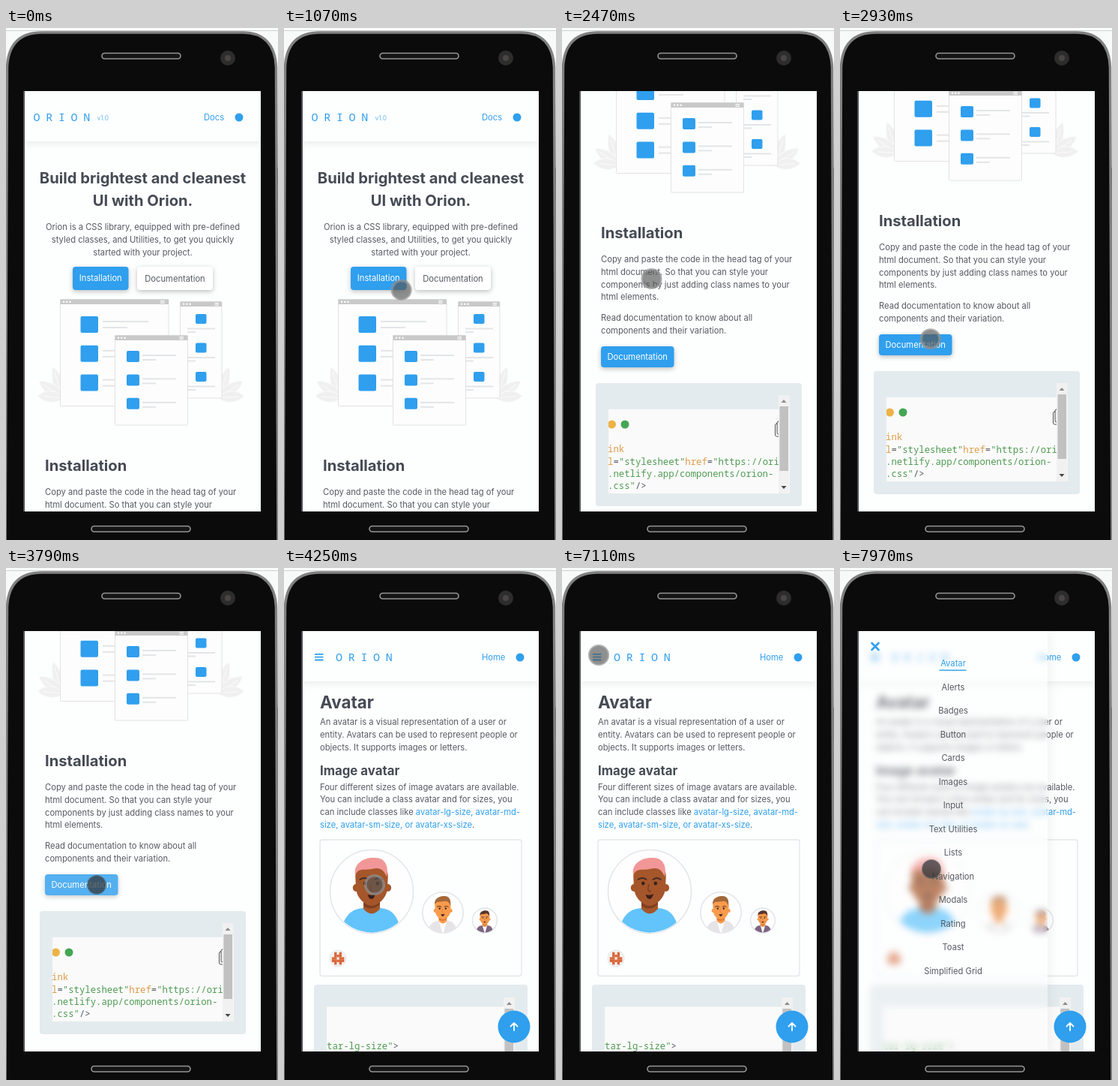
Animation of 363 by 682 pixels, one loop 8000 ms. Source, as an HTML page:

```html
<!DOCTYPE html>
<html lang="en">
<head>
<meta charset="utf-8">
<title>Orion on a phone</title>
<style>
html, body { margin: 0; width: 100%; height: 100%; overflow: hidden; background: #f8f9f9; }
#stage { position: relative; width: 363px; height: 682px; overflow: hidden; }
#stage svg { position: absolute; left: 0; top: 0; display: block; }
#screen { position: absolute; left: 25px; top: 84px; width: 315px; height: 560px; overflow: hidden; background: #fdfefe; }
#menu {
  position: absolute; left: 0; top: 0; width: 252px; height: 560px;
  background: rgba(255,255,255,.28); backdrop-filter: blur(5px);
  box-shadow: 2px 0 16px rgba(0,0,0,.06);
}
text { font-family: Inter, sans-serif; font-size: 11.2px; fill: #555a61; }
.mono { font-family: "Noto Sans Mono", monospace; font-size: 12.3px; }
.brand { font-family: "Noto Sans Mono", monospace; font-size: 15px; letter-spacing: 7.7px; fill: #2f9fee; }
.bar { filter: drop-shadow(0 3px 5px rgba(0,0,0,.07)); }
.lift { filter: drop-shadow(0 2px 3px rgba(0,0,0,.25)); }
</style>
</head>
<body>
<div id="stage">
  <svg id="phone" width="363" height="682"></svg>
  <div id="screen">
    <svg id="home" width="315" height="560" viewBox="25 84 315 560"></svg>
    <svg id="docs" width="315" height="560" viewBox="25 84 315 560"></svg>
    <div id="menu"><svg width="252" height="560" viewBox="25 84 252 560"></svg></div>
  </div>
  <svg width="363" height="682"><circle id="touch"/></svg>
</div>
<script>
const BLUE = '#2f9fee', LINE = '#e3e5e7', GREEN = '#4f9a52', ORANGE = '#dd9a45', INK = '#555a61';
const $ = s => document.querySelector(s);

const rect = (x, y, w, h, fill, r = 0, extra = '') =>
  `<rect x="${x}" y="${y}" width="${w}" height="${h}" rx="${r}" fill="${fill}" ${extra}/>`;
const disc = (x, y, r, fill, extra = '') => `<circle cx="${x}" cy="${y}" r="${r}" fill="${fill}" ${extra}/>`;
const path = (d, fill, extra = '') => `<path d="${d}" fill="${fill}" ${extra}/>`;
const stroke = (color, w = 1) => `stroke="${color}" stroke-width="${w}" stroke-linecap="round" stroke-linejoin="round"`;
// y is the visual middle of the line
const text = (s, x, y, { size = 11.2, fill = INK, weight = 400, anchor = 'start' } = {}) =>
  `<text x="${x}" y="${y + size * .36}" text-anchor="${anchor}" style="font-size:${size}px;font-weight:${weight};fill:${fill}">${s}</text>`;
const lines = (rows, x, y, opt) => rows.map((s, i) => text(s, x, y + i * 16.75, opt)).join('');
const head = (s, x, y, size, anchor) => text(s, x, y, { size, weight: 700, fill: '#454b54', anchor });
const brand = x => `<text class="brand" x="${x}" y="123.5">ORION</text>`;
const code = (parts, x, y) => `<text class="mono" x="${x}" y="${y + 4.4}">` +
  parts.map(([s, c]) => `<tspan style="fill:${c}">${s}</tspan>`).join('') + '</text>';
const button = (id, label, x, y, w, h, fill, ink, dy = 0) =>
  `<g id="${id}">${rect(x, y, w, h, fill, 4, 'class="lift"')}${text(label, x + w / 2, y + h / 2 + dy, { fill: ink, anchor: 'middle' })}</g>`;
const header = () => rect(25, 70, 315, 81, '#fdfefe', 0, 'class="bar"');
const tri = (x, y, s, fill) => path(`M${x - 3.5} ${y + 2 * s}h7l-3.5 ${-4 * s}z`, fill);

function drawPhone() {
  $('#phone').innerHTML =
    rect(0, 0, 363, 3, '#fbfcfc') + rect(0, 3, 363, 1, '#cfd1d1') +
    rect(358, 185, 5, 46, '#555', 2) + rect(358, 307, 5, 71, '#555', 2) +
    path('M-1 700L1.500 52C3 22 18 6 48 6H316C344 6 359 22 360.500 52L363 700Z', '#0b0b0b', stroke('#808080', 3.5)) +
    rect(128, 33.5, 105, 7.5, '#151515', 3.75, stroke('#949494', 1.6)) +
    rect(114, 663.5, 132, 7.5, '#151515', 3.75, stroke('#949494', 1.6)) +
    disc(296, 40, 10, '#2d2d2d') + disc(296, 40, 4, '#4a4545') +
    rect(23, 84, 2, 560, '#505154');
}

// browser window with rows of a square and two lines
function pane(x, y, w, h, burger, rows) {
  let s = rect(x, y, w, h, '#fdfdfd', 1, stroke('#e2e2e2')) + rect(x, y, w, 6.5, '#c9c9c9');
  for (let i = 0; i < 3; i++) {
    s += disc(x + 4.5 + i * 4.3, y + 3.3, 1.2, '#fff');
    s += rect(x + w - burger, y + 1.4 + i * 1.6, 5.5, .8, '#fff');
  }
  const { sx, sy, sw, sh, step, lx, ly, gap, l1, l2 } = rows;
  for (let i = 0; i < 3; i++) {
    const d = i * step;
    s += rect(sx, sy + d, sw, sh, BLUE, 2) +
      rect(lx, ly + d, l1, 2, LINE) + rect(lx, ly + gap + d, l2, 2, LINE);
  }
  return s;
}

function leaves(x, y, dir) {
  return [-72, -35, -5].map((a, i) =>
    `<g transform="translate(${x} ${y}) scale(${dir} 1) rotate(${a})">` +
    path(`M0 0C8 -11 ${28 - i * 2} -10 ${44 - i * 5} 0C${28 - i * 2} 9 8 9 0 0Z`, '#f0f0f0', stroke('#fafafa')) +
    path(`M2 0H${36 - i * 5}`, 'none', stroke('#fafafa')) + '</g>').join('');
}

function codeBox() {
  const y = 783, track = 289;
  return rect(45, y, 275, 164, '#e4ebee', 4) + rect(62, y + 35, 242, 112, '#fafafa') +
    `<clipPath id="pre"><rect x="61" y="${y + 35}" width="228.500" height="112"/></clipPath><g clip-path="url(#pre)">` +
    disc(66.5, y + 55, 5.5, '#edb347') + disc(84, y + 55, 5.5, '#45a653') +
    rect(60, y + 35, 2, 112, '#e4ebee') +
    rect(284.5, y + 54, 10, 17, '#fafafa', 2, stroke('#555')) + rect(287, y + 51, 10, 17, '#ececec', 2, stroke('#555')) +
    code([['ink', ORANGE]], 61, 871) +
    code([['l', ORANGE], ['=', INK], ['"stylesheet"', GREEN], ['href', ORANGE], ['=', INK], ['"https://ori', GREEN]], 61, 887.5) +
    code([['.netlify.app/components/orion-', GREEN]], 61, 904) +
    code([['.css"', GREEN], ['/>', INK]], 61, 920) + '</g>' +
    rect(track, y + 16, 14.5, 131, '#f1f1f1') + rect(track + 1.5, y + 31, 11.5, 86, '#c1c1c1') +
    tri(track + 7, y + 24, 1, '#8c8c8c') + tri(track + 7, y + 139, -1, '#444');
}

function drawHome() {
  $('#home').innerHTML = '<g id="page">' + header() + brand(36.5) +
    text('v1.0', 121.5, 119.5, { size: 8.4, fill: '#6cbcf3' }) +
    text('Docs', 264, 119, { fill: BLUE }) + disc(311, 119, 5.5, BLUE) +
    head('Build brightest and cleanest', 182.5, 200, 20.2, 'middle') +
    head('UI with Orion.', 182.5, 230, 20.2, 'middle') +
    lines(['Orion is a CSS library, equipped with pre-defined', 'styled classes, and Utilities, to get you quickly',
      'started with your project.'], 182.5, 265, { anchor: 'middle' }) +
    button('install', 'Installation', 89, 318, 74.5, 31, BLUE, '#fff', -1) +
    button('more', 'Documentation', 175, 318, 101, 31, '#fff', INK, .5) +
    leaves(76, 493, -1) + leaves(284, 493, 1) +
    pane(72.5, 361.5, 144.5, 142, 11, { sx: 99.5, sy: 384, sw: 23.5, sh: 22, step: 38.8, lx: 129, ly: 390, gap: 8, l1: 61, l2: 33 }) +
    pane(232.5, 364.5, 55.5, 128.5, 9.5, { sx: 253, sy: 381, sw: 14.5, sh: 13, step: 38.5, lx: 242, ly: 399.5, gap: 4.5, l1: 37, l2: 11 }) +
    pane(145.5, 409.5, 97, 119.5, 11, { sx: 161, sy: 430, sw: 17, sh: 15, step: 31.4, lx: 182, ly: 435, gap: 6, l1: 45, l2: 18 }) +
    head('Installation', 52, 583, 20.2) +
    lines(['Copy and paste the code in the head tag of your', 'html document. So that you can style your',
      'components by just adding class names to your', 'html elements.'], 52, 618) +
    lines(['Read documentation to know about all', 'components and their variation.'], 52, 696) +
    button('open', 'Documentation', 52, 734, 97.5, 28, BLUE, '#fff') + codeBox() + '</g>';
}

function avatar(id, x, y, k, { skin, dark, hair, shirt, inner = shirt }) {
  return `<g transform="translate(${x} ${y}) scale(${k})">` +
    `<clipPath id="${id}"><circle r="54.500"/></clipPath>` + disc(0, 0, 55.5, '#fefefe', stroke('#e3e6ea', 1.6 / k)) +
    `<g clip-path="url(#${id})">` +
    path('M-42 60C-38 28 -24 23 -11 22H11C24 23 36 28 40 60Z', shirt) +
    path('M-11 22H11L0 60Z', inner) +
    path('M-11 5H11V23Q0 36 -11 23Z', skin) + path('M-11 14Q0 24 11 14V17Q0 27 -11 19Z', dark) +
    '<g transform="scale(.87 1)">' + disc(-24, -5, 5, skin) + disc(25, -5, 5, skin) +
    path('M-25 -20C-25 -46 25 -46 25 -20L24 -3C22 10 10 18 0 18S-22 10 -24 -3Z', skin) +
    path('M-25 -22C-29 -38 -10 -46 4 -45C20 -46 27 -34 23 -20C18 -30 12 -33 0 -30C-12 -28 -20 -32 -25 -22Z', hair) +
    path('M-18 -16Q-11 -20 -5 -16M5 -16Q11 -20 17 -16', 'none', stroke('#432a25', 2)) +
    disc(-10, -11, 2.6, '#35221f') + disc(9, -11, 2.6, '#35221f') +
    path('M-1 -9Q-5 -1 1 0', 'none', stroke(dark, 1.8)) +
    path('M-6 4Q1 6 6 3Q3 11 -1 10Q-5 9 -6 4Z', '#3a201c') + '</g></g></g>';
}

function identicon(x, y, cell) {
  return disc(x, y, 11, '#f5f3f2', stroke('#e3e6ea')) +
    ['.#.#.', '.###.', '##.##', '#####', '.#.#.'].map((row, r) => [...row].map((c, i) =>
      c === '#' ? rect(x + (i - 2.5) * cell, y + (r - 2.5) * cell, cell + .1, cell + .1, '#d9683a') : '').join('')).join('');
}

function drawDocs() {
  const burger = [0, 1, 2].map(i => rect(41, 114 + i * 3.8, 11.5, 1.8, BLUE, .5)).join('');
  const link = s => `<tspan style="fill:${BLUE}">${s}</tspan>`;
  $('#docs').innerHTML = rect(25, 84, 315, 560, '#fdfefe') + header() + burger + brand(69) +
    text('Home', 264, 119, { fill: BLUE }) + disc(315, 119, 5.5, BLUE) +
    head('Avatar', 48, 179, 22.4) +
    lines(['An avatar is a visual representation of a user or', 'entity. Avatars can be used to represent people or',
      'objects. It supports images or letters.'], 48, 205) +
    head('Image avatar', 48, 270, 16.8) +
    lines(['Four different sizes of image avatars are available.', 'You can include a class avatar and for sizes, you',
      'can include classes like ' + link('avatar-lg-size, avatar-md-'),
      link('size, avatar-sm-size, or avatar-xs-size') + '.'], 48, 291.5) +
    rect(48, 362, 269, 181.5, 'none', 3, stroke('#e2e7eb', 1.4)) +
    avatar('big', 117, 431, 1, { skin: '#a5562a', dark: '#7f3e20', hair: '#f29797', shirt: '#62c4fb' }) +
    avatar('mid', 212, 459, .49, { skin: '#f99b4c', dark: '#d97a35', hair: '#a4683a', shirt: '#e6e4e6', inner: '#fff' }) +
    avatar('small', 268, 469.5, .295, { skin: '#f3974c', dark: '#cf7434', hair: '#5a352c', shirt: '#7c6580', inner: '#fff' }) +
    identicon(72, 520, 3.3) +
    rect(40, 555, 285, 110, '#e4ebee', 4) + rect(57, 584.5, 251, 70, '#fafafa') +
    rect(293, 572, 15, 80, '#f1f1f1') + tri(300.5, 580, 1, '#8c8c8c') +
    '<g id="late">' + rect(294.5, 587, 11.5, 60, '#c1c1c1') + code([['tar-lg-size"', GREEN], ['>', INK]], 57, 637) + '</g>' +
    disc(307, 611, 21.5, BLUE) + path('M307 616V606.500M302.500 610.500L307 606L311.500 610.500', 'none', stroke('#fff', 1.8));
}

function drawMenu() {
  const items = ['Avatar', 'Alerts', 'Badges', 'Button', 'Cards', 'Images', 'Input', 'Text Utilities',
    'Lists', 'Navigation', 'Modals', 'Rating', 'Toast', 'Simplified Grid'];
  $('#menu svg').innerHTML = path('M42.500 100L51.500 109M51.500 100L42.500 109', 'none', stroke(BLUE, 2.6)) +
    items.map((s, i) => text(s, 151, 127 + i * 31.5, { anchor: 'middle', fill: i ? INK : BLUE })).join('') +
    rect(132.5, 135.5, 36, 1.4, BLUE);
}

const LOOP = 8000, TICK = 66.45;
const clamp = v => Math.min(1, Math.max(0, v));
const prog = (t, a, b) => clamp((t - a) / (b - a));
const easeOut = (p, n = 3) => 1 - (1 - p) ** n;
const easeInOut = p => p * p * (3 - 2 * p);

// start, end, x, y, power of the vertical ease-out
const moves = [
  [470, 1200, 120, 338, 2], [1869, 1870, 119.5, 334, 1], [2665, 3000, 121, 418, 2], [3130, 3260, 121, 422, 1],
  [5986, 6520, 49, 103, 3.3], [6651, 6780, 49, 116, 1], [7590, 7900, 122, 401, 2]
];
const presses = [[2070, 2270], [3520, 3850], [6980, 7110], [7900, LOOP]];

function touchAt(t) {
  let x = 323, y = 672;
  for (const [a, b, tx, ty, n] of moves) {
    const p = prog(t, a, b);
    x += (tx - x) * p;
    y += (ty - y) * easeOut(p, n);
  }
  return [x, y];
}

function render(now) {
  // the picture advances about 15 times a second
  const t = Math.floor((now % LOOP + 5) / TICK) * TICK + 5;
  const scroll = Math.round(326 * easeInOut(prog(t, 2166, 2509)));
  $('#page').setAttribute('transform', `translate(0 ${-scroll})`);
  $('#install').style.opacity = 1 - .1 * prog(t, 2010, 2200);
  $('#install text').style.opacity = 1 - .4 * prog(t, 2010, 2200);
  $('#open').style.opacity = 1 - .18 * prog(t, 3460, 3720);

  const onDocs = t >= 3850;
  $('#home').style.display = onDocs ? 'none' : 'block';
  $('#docs').style.display = onDocs ? 'block' : 'none';
  $('#late').style.opacity = prog(t, 3990, 4250);

  const slide = easeOut(prog(t, 7385, 7760), 2);
  $('#menu').style.display = slide > 0 ? 'block' : 'none';
  $('#menu').style.transform = `translateX(${-252 * (1 - slide)}px)`;

  const [x, y] = touchAt(t), down = presses.some(([a, b]) => t >= a && t < b);
  const look = { cx: x, cy: y, r: down ? 12 : 12.3, 'stroke-width': down ? 2 : 3.5,
    fill: down ? 'rgba(48,54,60,.74)' : 'rgba(85,85,85,.66)',
    stroke: down ? 'rgba(80,88,94,.6)' : 'rgba(145,145,145,.7)',
    visibility: t >= 470 ? 'visible' : 'hidden' };
  for (const key in look) $('#touch').setAttribute(key, look[key]);
}

drawPhone();
drawHome();
drawDocs();
drawMenu();
const start = performance.now();
(function frame() {
  render(performance.now() - start);
  requestAnimationFrame(frame);
})();
</script>
</body>
</html>
```
